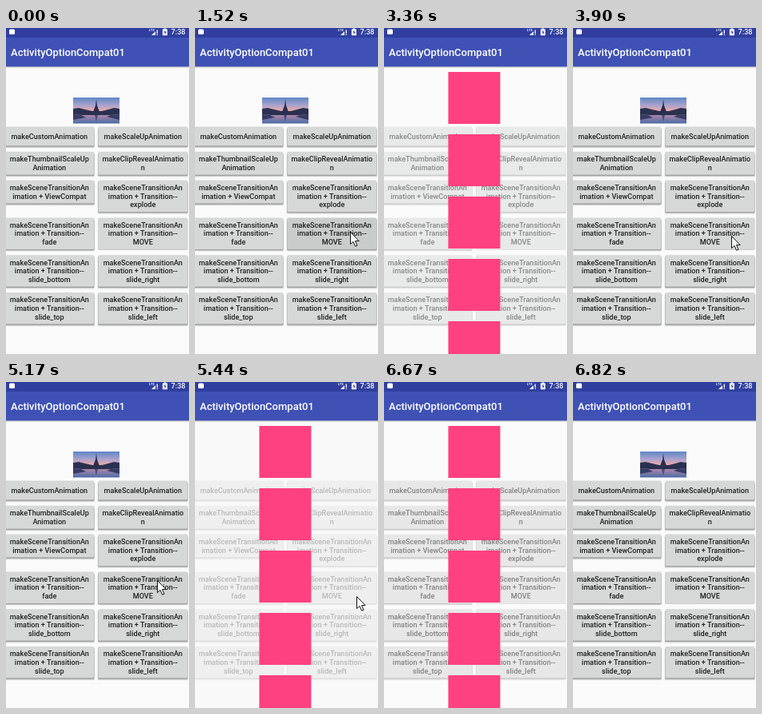
An HTML page for the animation above (7.35 s loop, 229 by 408 pixels).

```html
<!DOCTYPE html>
<html lang="en">
<head>
<meta charset="utf-8">
<title>ActivityOptionCompat01</title>
<style>
  html, body { margin: 0; width: 100%; height: 100%; overflow: hidden; background: #fafafa; }
  svg { display: block; width: 100%; height: 100%; }
  text { font-family: Roboto, sans-serif; font-weight: 500; }
  .label { font-size: 9.1px; fill: #1f1f1f; text-anchor: middle; }
</style>
</head>
<body>
<svg viewBox="0 0 229 408" preserveAspectRatio="none">
  <defs>
    <linearGradient id="sky" x1="0" y1="0" x2="0" y2="1">
      <stop offset="0" stop-color="#5f86c4"/>
      <stop offset=".3" stop-color="#a9a3cd"/>
      <stop offset=".52" stop-color="#f0aaa6"/>
      <stop offset=".64" stop-color="#b98aa8"/>
      <stop offset="1" stop-color="#4a6ba6"/>
    </linearGradient>
    <linearGradient id="drop" x1="0" y1="0" x2="0" y2="1">
      <stop offset="0" stop-color="#000" stop-opacity=".26"/>
      <stop offset="1" stop-color="#000" stop-opacity="0"/>
    </linearGradient>
  </defs>
  <rect width="229" height="408" fill="#fafafa"/>

  <g id="menu">
    <g id="photo">
      <rect x="84" y="87" width="58" height="32.5" fill="url(#sky)"/>
      <path d="M84 101l7-1 8 2 9 2h12l8-2 7-2 7 1v7l-12 1h-34l-12-1z" fill="#2b3050"/>
      <path d="M84 108l10 1 6 3-16 3zM142 108l-11 1-5 2 16 4z" fill="#353c66"/>
      <path d="M113 89l1 8 3 8h-8l3-8z" fill="#292e50"/>
      <path d="M111 109h4l-2 8z" fill="#4b4e79"/>
    </g>
  </g>

  <rect id="veil" y="48" width="229" height="360" fill="#fafafa"/>
  <g id="tiles" fill="#ff4081"></g>

  <rect y="48" width="229" height="2.6" fill="url(#drop)"/>
  <rect y="11" width="229" height="37.3" fill="#3f51b5"/>
  <rect width="229" height="12" fill="#303f9f"/>
  <text x="6" y="35.4" font-size="13" fill="#fff">ActivityOptionCompat01</text>

  <g fill="#fff">
    <rect x="4" y="1.5" width="7" height="6.5" rx="1.6"/>
    <text x="178.8" y="4.2" font-size="4.4">LTE</text>
    <path d="M182 9L187 4.2V9z"/>
    <path d="M188.6 2.4h1.3V7h-1.3zM188.6 7.8h1.3V9h-1.3z"/>
    <path d="M197.6 1.4V.6h2.6v.8h1.7v7.8h-6V1.4z"/>
    <path d="M199.4 2.4l-2 3.2h1.3v2.6l2-3.2h-1.3z" fill="#303f9f"/>
    <text x="206.6" y="8.4" font-size="9.1">7:38</text>
  </g>

  <path id="cursor" d="M.5 .5V15.6L4 12.4L6.6 18.2L9 17.2L6.5 11.6H11.2Z"
        fill="#fff" stroke="#111" stroke-width="1" stroke-linejoin="round"/>
</svg>

<script>
const LOOP = 7350;
const $ = id => document.getElementById(id);

function add(parent, name, attrs, text = '') {
  const el = document.createElementNS('http://www.w3.org/2000/svg', name);
  for (const key in attrs) el.setAttribute(key, attrs[key]);
  el.textContent = text;
  parent.append(el);
  return el;
}

const scene = kind => ['makeSceneTransitionAn', 'imation + Transition--', kind];
const rows = [
  [123.6, ['makeCustomAnimation'], ['makeScaleUpAnimation']],
  [154.8, ['makeThumbnailScaleUp', 'Animation'], ['makeClipRevealAnimatio', 'n']],
  [190.6, ['makeSceneTransitionAn', 'imation + ViewCompat'], scene('explode')],
  [237.4, scene('fade'), scene('MOVE')],
  [284.2, scene('slide_bottom'), scene('slide_right')],
  [331, scene('slide_top'), scene('slide_left')]
];
const heights = [0, 24, 29, 39.6];

function addButton(x, y, lines) {
  const h = heights[lines.length], g = add($('menu'), 'g', {});
  const box = (dx, dy, fill, opacity) => add(g, 'rect', {
    x: x - dx, y: y + dy, width: 111.8 + 2 * dx, height: h, rx: 1.5, fill, 'fill-opacity': opacity
  });
  const lift = add(g, 'g', {});
  lift.append(box(.8, 2.6, '#000', .1), box(.3, 1.8, '#000', .14));
  box(.4, 1.1, '#000', .1);
  box(0, .6, '#000', .18);
  const face = box(0, 0, '#d6d7d7', 1);
  lines.forEach((line, i) => add(g, 'text', {
    class: 'label', x: x + 55.9, y: y + h / 2 + 3.2 + (i - (lines.length - 1) / 2) * 10.7
  }, line));
  return { face, lift };
}

let move;
for (const [y, left, right] of rows) {
  addButton(-1.6, y, left);
  const button = addButton(115.4, y, right);
  if (right[2] === 'MOVE') move = button;
}
for (let i = 0; i < 5; i++) {
  add($('tiles'), 'rect', { x: 80.4, y: 55 + i * 78, width: 65, height: 65 });
}

// Stepped tracks: [start time, value], held until the next entry.
const veil = [
  [0, 0], [1650, .5], [1800, .85], [1930, 1], [3360, .48], [3480, .15], [3630, 0],
  [5290, .4], [5440, .7], [5560, .9], [5680, 1], [6670, .45], [6820, 0]
];
const tiles = [[0, 0], [1650, 1], [3630, 0], [5290, 1], [6820, 0]];
const face = [[0, '#d6d7d7'], [1220, '#c9cccb'], [1930, '#d6d7d7'], [5170, '#d1d3d2'], [5680, '#d6d7d7']];
const lift = [[0, 0], [1370, 1], [1930, 0], [5170, 1], [5680, 0]];
const cursor = [
  [0, null], [150, [220, 306]], [270, [215, 288]], [420, [200, 263]], [540, [194, 255]],
  [1800, [205, 270]], [1930, [218, 287]], [2080, null],
  [3630, [220, 306]], [3750, [215, 288]], [3900, [198, 260]], [4020, [189, 248]],
  [5440, [202, 268]], [5560, [216, 287]], [5680, null]
];
const at = (track, t) => track.findLast(step => step[0] <= t)[1];

function draw(t) {
  $('veil').setAttribute('opacity', at(veil, t));
  $('tiles').setAttribute('opacity', at(tiles, t));
  move.face.setAttribute('fill', at(face, t));
  move.lift.setAttribute('opacity', at(lift, t));
  const tip = at(cursor, t);
  $('cursor').setAttribute('visibility', tip ? 'visible' : 'hidden');
  if (tip) $('cursor').setAttribute('transform', `translate(${tip})`);
}

const start = performance.now();
function tick() {
  draw((performance.now() - start) % LOOP);
  requestAnimationFrame(tick);
}
tick();
</script>
</body>
</html>
```
